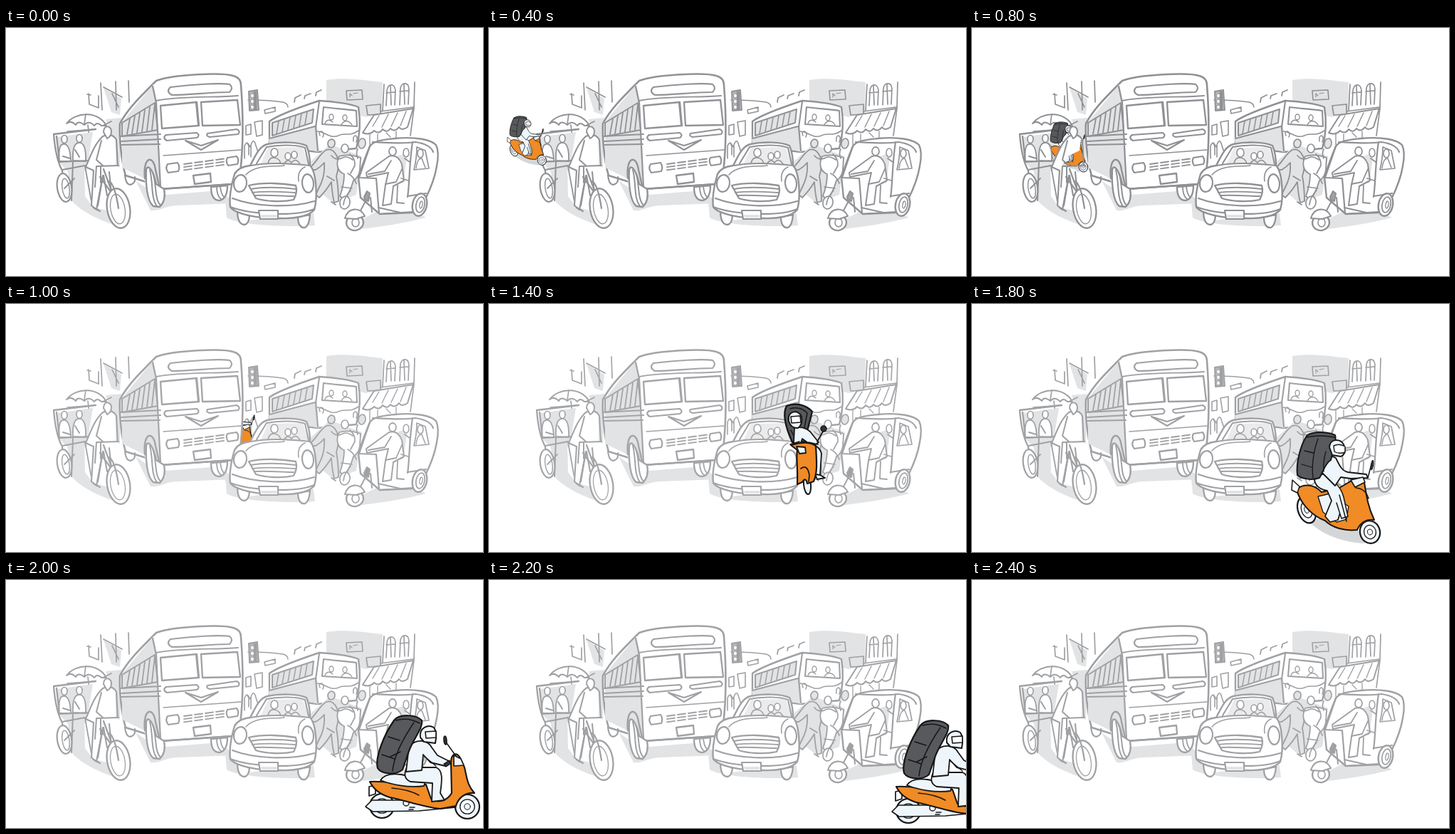
Animation of 670 by 348 pixels, one loop 2.6 s. Source, as an HTML page with a canvas:

```html
<!DOCTYPE html>
<html lang="en">
<head>
<meta charset="utf-8">
<title>Scooter in traffic</title>
<style>
html, body { margin: 0; width: 100%; height: 100%; overflow: hidden; background: #fff; }
canvas { display: block; width: 670px; height: 348px; }
</style>
</head>
<body>
<canvas id="stage" width="670" height="348"></canvas>
<script>
const ctx = document.getElementById('stage').getContext('2d');
const STEP = 200, STEPS = 13;
const SHADE = '#e2e3e4', WHITE = '#fff', ORANGE = '#f08b26', PACK = '#58595c', SUIT = '#eef6fc', BLACK = '#161616';
let ink = '#929397';
ctx.lineCap = ctx.lineJoin = 'round';

function shape(d, fill, width = 2, color = ink) {
  const p = new Path2D(d);
  if (fill) { ctx.fillStyle = fill; ctx.fill(p); }
  if (width) { ctx.strokeStyle = color; ctx.lineWidth = width; ctx.stroke(p); }
}
const line = (d, width) => shape(d, null, width);
const tint = (d, color = SHADE) => shape(d, color, 0);

function oval(x, y, rx, ry, tilt = 0, fill = WHITE, width = 2, color = ink) {
  ctx.beginPath();
  ctx.ellipse(x, y, rx, ry, tilt, 0, Math.PI * 2);
  if (fill) { ctx.fillStyle = fill; ctx.fill(); }
  if (width) { ctx.strokeStyle = color; ctx.lineWidth = width; ctx.stroke(); }
}

function ground() {
  tint('M86 196L110 192L111 236L122 251L145 257L158 278C130 270 104 256 93 243Z');
  tint('M182 214L212 235L300 228L322 246L240 249C222 250 214 258 203 256Z');
  tint('M308 244L318 236L340 270L432 260L434 277C390 280 325 276 310 266Z');
  tint('M497 270L520 258L575 258L590 266C560 274 525 279 500 282Z');
}

function buildings() {
  tint('M137 84L162 99L160 122L148 118Z');
  tint('M140 128L162 126L160 196L154 192L154 156L146 146Z');
  line('M116 92L117 107L130 112V95M114 93L119 94M133 77L135 115M154 75L155 115M172 74L173 104M137 83L163 97M149 92L158 111', 1.7);
  tint('M450 73C480 68 512 75 529 76L528 121L505 125L450 110Z');
  shape('M478 88L500 87L501 100L479 101Z', null, 1.6);
  line('M483 97V92L486 95M488 92L494 91', 1.2);
  line('M506 109L526 107V121L508 122ZM531 79L529 116M574 76L573 113L568 151M526 117L572 111', 1.7);
  line('M534 109L535 89C536 77 546 77 547 88L546 108M553 108L554 85C555 76 565 75 566 85L565 107M540 81L541 108M559 79L560 107M534 91L546 90M553 89L565 88', 1.7);
  shape('M517 122L572 113L564 139Q556 145 552 139Q546 147 540 141Q535 148 529 142Q524 150 517 144Q511 151 501 147Z', WHITE);
  line('M524 123L515 138M537 121L528 139M550 119L541 138M562 117L554 137', 1.4);
  line('M511 149V164M522 149V158M534 147L540 153M548 145V154', 1.3);
  line('M405 104L406 98L414 94M419 99L420 95L428 92M435 95L436 90L443 87', 1.8);
  line('M340 101C360 101 376 102 389 104Q396 106 396 111M363 115L378 111V117L364 120ZM337 137L344 135V149L337 150ZM349 132L360 130V150L352 152Z', 1.6);
  shape('M341 89L353 87L355 115L342 116Z', '#b6b7b9', 1.9);
  line('M349 90V114M351 90V114', 2.6);
  oval(346, 95, 2.5, 3, 0, WHITE, 1);
  oval(346, 103, 2.5, 3, 0, WHITE, 1);
  oval(346, 111, 2.5, 3, 0, WHITE, 1);
}

function farBus() {
  shape('M370 131C382 122 422 108 440 102C462 103 486 107 495 111C498 129 497 151 492 169L438 174L370 166Z', WHITE, 2.4);
  tint('M369 154L437 137L439 174L400 165L370 168Z');
  tint('M375 133L431 115L430 132L374 150Z');
  line('M440 103L435 139L438 172M374 133L432 114L430 133L374 151ZM370 155L434 138', 2.1);
  for (let i = 0; i < 6; i++) line(`M${383 + i * 8} ${131 - i * 2.6}l-3 17`, 1.5);
  shape('M446 111C461 113 479 114 492 116L493 138L444 135Z', null, 2.1);
  line('M448 134C450 128 455 128 459 132M471 136C474 129 482 129 486 136', 1.4);
  oval(457, 125, 3, 4, 0, WHITE, 1.4);
  oval(476, 126, 3, 4, 0, WHITE, 1.4);
  line('M437 145C447 145 455 156 467 151C475 146 483 153 495 144M441 151Q438 145 443 145Q448 147 445 153M488 159Q487 151 491 151Q495 153 492 160', 1.6);
}

function crowd() {
  tint('M425 190L455 163L500 180L492 234L460 246L435 225Z');
  shape('M450 171C441 176 437 187 428 195Q430 200 435 199Q442 195 447 189Q448 205 443 217L435 234L440 238Q450 228 457 216Q458 232 461 245L467 243Q467 224 464 208Q469 193 465 180Q459 168 450 171Z', SHADE, 1.8);
  oval(457, 162, 5, 6, .2, SHADE, 1.8);
  shape('M468 180C463 190 465 201 475 205Q475 220 469 236L476 241Q484 228 488 214Q496 209 497 199L498 182Q482 176 468 180Z', WHITE, 1.8);
  oval(476, 169, 5, 6, 0, WHITE, 1.7);
  oval(500, 162, 5, 7, .2, SHADE, 1.6);
  line('M457 179Q464 187 473 182Q479 179 487 185M483 177Q491 184 490 193L484 204M494 170Q491 175 494 183M451 208L461 214', 1.7);
  oval(476, 245, 7, 9, .2, WHITE, 1.7);
  line('M474 248Q475 237 484 228M471 223L486 225M480 204Q488 208 492 218M457 244L463 248', 1.7);
  line('M335 183V166Q338 157 341 166V178M344 181V164Q348 153 351 165L354 174M339 161L344 168', 1.6);
}

function bus() {
  shape('M160 134C172 112 191 94 211 74C235 65 304 62 319 67Q330 70 330 80C333 118 334 160 329 203L319 219L217 226L197 216L168 207C162 187 159 155 160 134Z', WHITE, 2.6);
  tint('M163 132L207 79L212 105L216 225L203 252L194 211L163 196Z');
  shape('M163 133L209 105L213 143L163 152Z', null, 2);
  for (let i = 0; i < 6; i++) line(`M${174 + i * 7} ${127 - i * 4}l-4 ${22 + i * 2.8}`, 1.8);
  line('M160 152L217 149M162 159L217 156M162 164L216 163M206 82L211 105L217 224', 2.2);
  line('M211 102C248 95 294 98 326 95', 1.8);
  shape('M231 83C262 79 300 77 314 79Q320 84 314 90C286 90 258 94 233 94Q224 89 231 83Z', WHITE, 2.2);
  shape('M217 109L268 104L271 137L219 141Z', WHITE, 2.3);
  shape('M274 104L325 101L329 136L276 137Z', WHITE, 2.3);
  line('M267 105L270 136', 2.2);
  shape('M225 150L268 147Q273 151 268 154L226 158Q219 154 225 150Z', WHITE, 2.2);
  shape('M283 148L324 142Q330 145 326 149L286 153Q280 151 283 148Z', WHITE, 2.2);
  shape('M252 158L274 171L298 157L274 165Z', WHITE, 2.1);
  for (let r = 0; r < 3; r++)
    for (let c = 0; c < 4; c++) line(`M${250 + c * 15} ${191 + r * 4.2 - c * 2}l11 -1.5`, 1.8);
  line('M221 179L330 171', 1.4);
  shape('M227 191L241 189Q245 195 242 201L228 203Q223 197 227 191Z', WHITE, 2.2);
  shape('M311 182L324 180Q328 185 325 191L312 193Q308 187 311 182Z', WHITE, 2.2);
  shape('M263 207L287 204L288 216L265 219Z', WHITE, 2.3);
  line('M217 226L318 219M195 211C192 180 207 177 210 199L216 225', 2.4);
  shape('M197 199C196 219 198 243 207 250L216 251C222 245 224 236 222 226L211 219C207 199 199 190 197 199Z', WHITE, 2.3);
  line('M202 199C207 217 203 238 212 250M206 203C212 219 208 239 217 249', 2);
  line('M167 206C168 216 171 222 177 219Q182 217 181 209', 2.2);
  shape('M288 223C288 236 292 242 300 242C309 240 311 231 311 221Z', WHITE, 2.3);
  line('M296 223Q296 235 302 240M301 222Q302 233 306 237', 1.8);
}

function car() {
  shape('M325 256C325 268 328 276 335 276Q341 275 342 264Z', WHITE, 2.3);
  shape('M410 265C410 276 414 281 420 280Q426 277 427 262Z', WHITE, 2.3);
  shape('M343 193C349 182 355 166 367 163C386 159 411 160 422 165Q427 176 427 193C436 202 438 238 433 255C426 264 405 268 385 267C355 268 322 261 315 251C313 236 316 222 321 205Q326 195 343 193Z', WHITE, 2.4);
  tint('M358 190L368 168L417 167L424 191L400 192Z', '#ebebec');
  line('M352 190L366 167C385 163 410 164 420 168L425 191M344 193C370 188 398 190 427 193', 2.1);
  oval(377, 175, 5, 6, 0, WHITE, 1.6);
  oval(396, 180, 4, 5, 0, WHITE, 1.6);
  oval(405, 178, 4, 5, 0, WHITE, 1.6);
  line('M368 190Q370 181 377 182T386 190M390 191Q396 182 401 189Q407 181 413 191', 1.6);
  line('M337 206C350 191 379 195 391 193M420 195C411 199 410 208 411 215', 1.6);
  oval(329, 218, 9, 12, .15, WHITE, 2.2);
  oval(424, 218, 8, 13, -.1, WHITE, 2.2);
  shape('M341 221C362 216 390 218 407 221Q410 230 404 241C387 245 363 243 351 239Z', WHITE, 2.3);
  line('M344 226C366 222 390 224 407 226M346 231C368 228 389 230 406 231M349 235C370 234 391 236 404 236', 1.9);
  line('M318 239C349 251 400 253 433 243M315 251C344 262 407 265 433 254', 2.2);
  shape('M355 256L382 256V268L357 268Z', WHITE, 2.2);
  tint('M358 262H380V266H359Z');
}

function rickshaw() {
  shape('M85 134C98 117 130 116 141 137L134 137Q128 131 124 137Q116 129 110 136Q101 129 98 136Q91 129 85 134Z', WHITE, 2);
  line('M112 121L110 135M115 136L117 153M86 145L126 142M136 137L148 131', 1.7);
  tint('M72 153L122 146L113 200L90 205L76 190Z');
  line('M67 149L126 142M67 149C69 173 72 188 79 200L80 213M71 152L75 187', 2.3);
}

function riders() {
  shape('M75 187Q73 164 80 163Q90 161 91 187Z', WHITE, 1.8);
  shape('M94 186Q93 162 102 161Q113 160 112 187Z', WHITE, 1.8);
  oval(82, 156, 4, 5.5, 0, WHITE, 1.7);
  oval(103, 155, 4, 5.5, 0, WHITE, 1.7);
  line('M74 188L118 186M79 199L111 193M97 171L103 181M80 180L90 183M94 188L92 242', 2);
  oval(82, 224, 10, 20, -.15, WHITE, 2.2);
  oval(84, 225, 5, 14, -.15, WHITE, 1.5);
  line('M82 225L96 211M111 194L120 244', 1.8);
  tint('M133 151Q143 146 153 155L151 172L134 180L126 194L147 199L150 233L142 235L137 209L127 255L119 249L123 202L112 195Z', WHITE);
  line('M136 152C124 163 119 179 112 195L123 200L120 249L127 255L133 223L137 207L142 235L148 233L145 202M136 152Q149 146 155 157L157 193', 2.1);
  shape('M137 146C137 135 148 137 148 145Q148 152 142 155Z', WHITE, 2);
  line('M134 158L127 185L136 193M127 194L125 223M133 195V217', 2);
  line('M128 194L158 193M137 198L154 244M132 209L151 235M136 207L129 249M123 252L132 257', 2.2);
  oval(158, 253, 16, 28, -.17, WHITE, 2.3);
  oval(157, 254, 10, 21, -.17, null, 1.3);
  line('M145 215Q153 220 158 253', 2.2);
}

function tuk() {
  shape('M511 166C516 158 529 157 546 155C577 152 597 157 604 164Q609 174 605 194C602 213 595 228 589 240L571 259L525 261L498 238L495 209Q503 185 511 166Z', WHITE, 2.4);
  line('M515 160C537 161 558 163 575 160Q596 163 600 174M511 166L496 210L520 211L524 260M571 160C566 193 567 220 564 237M564 236L590 232M525 261L571 258', 2.2);
  line('M577 167L589 172L594 197L573 199Q577 183 577 167', 1.7);
  line('M576 197Q578 182 584 183L589 196', 1.5);
  oval(582, 176, 4, 6, 0, WHITE, 1.6);
  tint('M549 180L564 175L558 218L549 218Z');
  oval(562, 175, 4, 6, 0, WHITE, 1.5);
  shape('M538 180Q550 176 556 191L559 214L544 222L541 247L529 249L533 220L537 203L507 209L506 203Z', WHITE, 2);
  oval(543, 173, 5, 6, 0, WHITE, 1.8);
  line('M541 186L532 201L509 205M556 198L548 216L533 219M550 221L549 245L559 246M560 183L567 188M555 211L565 214', 1.8);
  shape('M503 237L507 229L511 232L509 243L504 242Z', '#a0a1a3', 2);
  line('M506 241L496 260M512 238L514 258M523 252L554 259', 2);
  oval(581, 248, 10, 16, .2, WHITE, 2.4);
  oval(582, 248, 6, 11, .2, WHITE, 1.8);
  oval(583, 248, 2, 5, .2, null, 1.4);
  oval(490, 273, 12, 11, -.2, WHITE, 2.3);
  oval(491, 273, 5, 6, 0, WHITE, 1.6);
  shape('M476 267C480 252 497 250 504 264L492 268Z', WHITE, 2.1);
}

const part = (d, fill, w = 1.8) => shape(d, fill, w, BLACK);
const round = (x, y, rx, ry, tilt, fill, w = 1.8) => oval(x, y, rx, ry, tilt, fill, w, BLACK);

function wheel(x, y, rx, ry, tilt) {
  round(x, y, rx, ry, tilt, SUIT, 2.2);
  round(x, y, rx * .6, ry * .6, tilt, '#fff', 1.3);
  round(x, y, rx * .25, ry * .25, tilt, SUIT, 1);
}

// Three-quarter view, box 447,178 to 575,338.
function turned() {
  tint('M473 305C493 326 526 335 552 336L540 313L500 298Z', '#d5d6d8');
  wheel(470, 289, 12, 19, -.35);
  wheel(559, 320, 14, 16, -.25);
  part('M456 260C465 252 480 252 491 264L516 258L533 248L551 250C554 269 556 284 565 303C553 301 545 308 541 317C524 319 506 314 496 304C479 298 461 281 456 260Z', ORANGE, 2);
  part('M486 270L503 266L529 284L526 302L512 306L493 292Z', SUIT, 1.3);
  part('M450 247L460 256L457 265L449 261Z', '#fff', 1.5);
  part('M482 238C478 250 485 260 499 262L505 276L496 298L503 306L514 303L522 276L510 253L507 240Z', SUIT);
  part('M510 251Q519 259 522 271L528 298L519 301L512 279', SUIT, 1.5);
  part('M492 237C490 217 501 210 511 216C516 226 519 234 528 236L554 239L556 244L532 245L518 243L510 255Z', SUIT);
  part('M470 185C481 177 502 180 510 184C513 193 506 209 504 219C495 224 492 239 488 244C477 248 462 245 457 240C455 224 461 199 470 185Z', PACK, 2);
  part('M470 187Q489 183 509 187M467 206L480 209M463 225L477 229M486 189C479 208 477 229 479 244M497 207Q493 221 494 235', null, 1.3);
  part('M502 201C503 188 517 189 522 197Q527 210 518 214L506 212Z', SUIT, 1.9);
  part('M508 199Q516 195 524 200V208Q515 211 509 207Z', '#fff', 1.4);
  part('M532 247L549 243L552 250L538 257Z', SUIT, 1.6);
  part('M556 244L561 225M539 258Q553 259 557 273M516 268L526 305', null, 1.5);
  round(562, 226, 1.6, 7, .15, '#333', 1);
}

// Head-on view, box 413,139 to 476,269.
function facing() {
  part('M448 225L464 213L465 240L472 244L461 246L457 236Z', SUIT);
  round(447, 253, 5, 14, -.1, SUIT, 2);
  part('M418 143C430 138 445 141 454 151L447 178L455 193L426 194C417 174 412 154 418 143Z', PACK, 2.3);
  part('M423 147Q437 143 447 153L443 174M424 177L433 194', null, 1.5);
  part('M429 174Q442 171 451 179L463 194L455 200L440 189L437 198L428 196Z', SUIT);
  part('M451 198Q464 198 467 210L465 240L459 239L456 215', SUIT);
  part('M421 164C418 150 435 147 439 158Q441 169 434 174Q424 175 421 164Z', SUIT, 2);
  part('M424 158L437 157L438 166L425 167Z', '#fff', 1.6);
  part('M424 198C440 193 452 194 459 199C460 218 462 236 456 249L447 252Q445 242 440 250L433 253C434 231 431 214 433 205Z', ORANGE, 2.2);
  part('M432 200L444 201L445 209L436 210Z', SUIT, 1.8);
  part('M438 231Q447 224 450 240L449 249M423 197L436 193M449 194L462 197M461 193L469 179', null, 1.7);
  round(470, 175, 4, 4, 0, '#333', 1.5);
}

// Side view, box 504,187 to 665,335.
function passing() {
  wheel(528, 317, 17, 17, 0);
  wheel(648, 318, 17, 17, 0);
  part('M505 318L514 309L560 309L632 319L580 324L515 325Z', SUIT, 1.6);
  round(562, 313, 4, 4, 0, '#fff', 1.4);
  part('M567 319H574M566 322H572', null, 1.5);
  part('M510 290L519 288V300L510 303Z', '#fff', 1.7);
  part('M511 283C535 281 564 290 590 287L597 307C606 313 619 311 626 299L625 257C625 244 632 241 637 248L644 263C648 280 648 288 658 299C643 298 635 307 632 317L610 321C586 319 561 309 539 305Q519 299 511 283Z', ORANGE, 2.1);
  part('M526 281Q533 270 555 273L590 280L587 289C565 292 541 287 526 281Z', SUIT);
  part('M563 263L604 263C615 267 612 284 610 299L616 309L598 311L599 285L568 283Q556 278 563 263Z', SUIT);
  part('M566 234C576 222 592 224 598 235L606 246L622 254L617 261L596 256L586 245L584 267L562 269Z', SUIT);
  part('M522 264C518 249 531 217 545 197C553 187 577 189 584 197C586 208 572 223 566 240L557 266C547 275 527 272 522 264Z', PACK, 2.2);
  part('M548 197Q565 192 581 201M537 220L553 225M528 245L546 251M573 200C558 222 545 246 543 268M540 248L554 241', null, 1.5);
  part('M582 221C580 207 593 202 601 207Q606 214 603 229L587 227Z', SUIT, 2);
  part('M589 213L604 212V221L590 222Z', '#fff', 1.6);
  part('M629 246L639 251L643 260L629 261Z', SUIT, 1.7);
  part('M615 258L623 253L624 258L618 262Z', '#333', 1.3);
  part('M619 229L632 247M542 292Q566 294 580 302M587 247L604 261', null, 1.5);
  round(617, 225, 2, 6, -.1, '#333', 1.5);
}

function place(pose, x, y, left, top, scale = 1) {
  ctx.save();
  ctx.translate(x, y);
  ctx.scale(scale, scale);
  ctx.translate(-left, -top);
  pose();
  ctx.restore();
}
const ride = (x, y, s) => () => place(turned, x, y, 447, 178, s);

// Layers: 0 behind everything, 1 behind the car, 2 behind the cyclist, 3 in front.
const stops = [
  null,
  [3, ride(-11, 117, .44)],
  [3, ride(25, 123, .44)],
  [2, ride(82, 128, .45)],
  [2, ride(106, 131, .45)],
  [0, ride(285, 133, .55)],
  [1, ride(354, 133, .6)],
  [3, facing],
  [3, () => place(facing, 437, 146, 413, 139, 1.08)],
  [3, turned],
  [3, passing],
  [3, () => place(passing, 565, 194, 504, 187)],
  null
];
const tone = i => i < 4 ? '#929397' : i < 5 ? '#8f9094' : i < 8 ? '#a4a5a8' : i < 9 ? '#9c9da0' : '#a0a1a4';

function render(i) {
  ink = tone(i);
  ctx.fillStyle = WHITE;
  ctx.fillRect(0, 0, 670, 348);
  const scooter = layer => { if (stops[i] && stops[i][0] === layer) stops[i][1](); };
  ground();
  buildings();
  farBus();
  crowd();
  scooter(0);
  bus();
  scooter(1);
  car();
  rickshaw();
  scooter(2);
  riders();
  tuk();
  scooter(3);
}

let start = null, shown = -1;
function tick(now) {
  if (start === null) start = now;
  const i = Math.floor((now - start) / STEP) % STEPS;
  if (i !== shown) render(shown = i);
  requestAnimationFrame(tick);
}
render(0);
requestAnimationFrame(tick);
</script>
</body>
</html>
```
